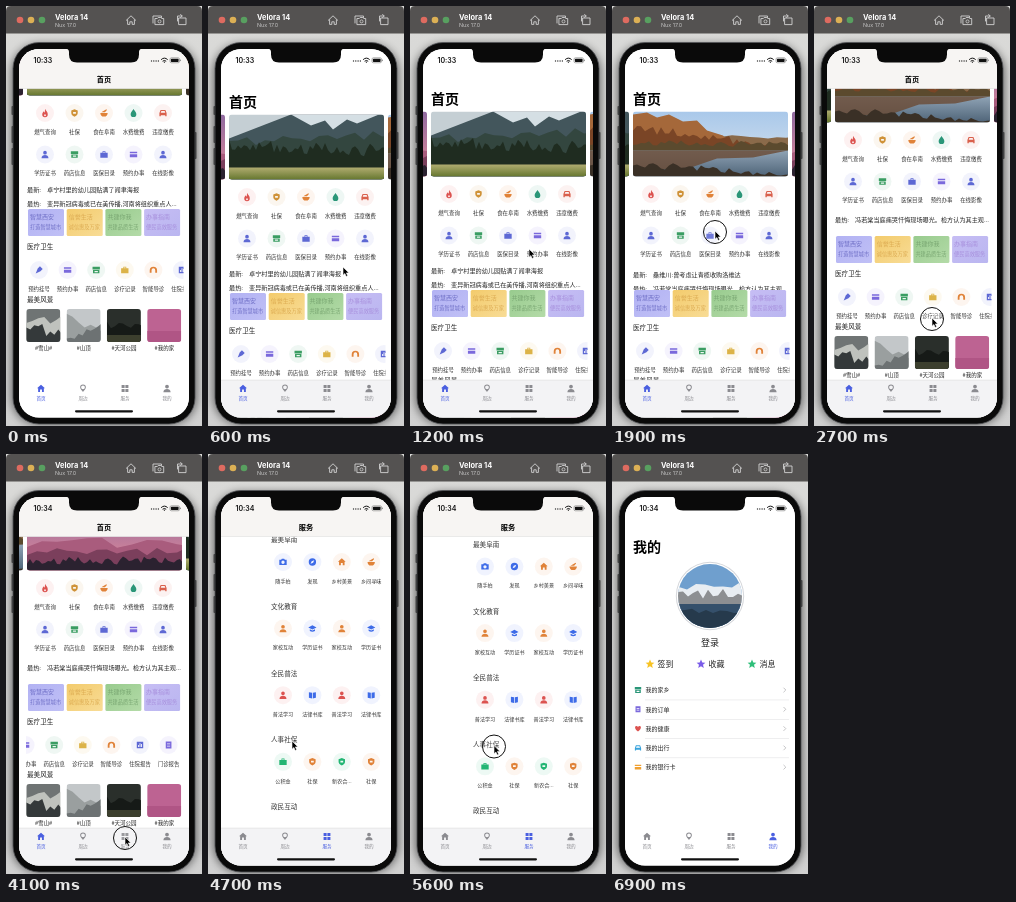
Animation of 196 by 420 pixels, one loop 7 s. Source, as an HTML page:

```html
<!DOCTYPE html>
<html lang="zh-CN">
<head>
<meta charset="utf-8">
<title>App tour</title>
<style>
html, body { margin: 0; width: 100%; height: 100%; overflow: hidden; background: #cfcfcf; }
svg { display: block; }
text { font-family: "Noto Sans CJK SC", "Noto Sans CJK", "Noto Sans", sans-serif; white-space: pre; }
.latin { font-family: Inter, "Noto Sans", sans-serif; }
.tab { color: #8b8b90; }
.tab.on { color: #4a5fe0; }
</style>
</head>
<body>
<svg id="stage" width="100%" height="100%" viewBox="0 0 196 420"></svg>
<script>
const LOOP = 7000, STEP = 100;
const RED = '#dc5350', GOLD = '#cf9238', ORANGE = '#e08238', GREEN = '#3a9d62', TEAL = '#2a9678',
      INDIGO = '#5d68d4', VIOLET = '#7a68dc', BLUE = '#3d6be8';

// Glyph outlines, centred on 0,0 in a box of about 8 units
const GLYPHS = {
  flame: 'M0-4.5C1-2 3.2-1 3 1.5A3 3 0 0 1-3 1.5C-3 0-2-1-1.7-2C-1-1-.8-.5-.5-.5C0-1.5 0-3 0-4.5ZM0 1Q-2 3 0 3.6Q2 3 0 1Z',
  shield: 'M0-4L3.5-2.8V0C3.5 2 2 3.3 0 4C-2 3.3-3.5 2-3.5 0V-2.8ZM-1.5-1.2V.8H1.5V-1.2Z',
  bowl: 'M-4 0H4C4 2 2.7 3.2 1.8 3.8H-1.8C-2.7 3.2-4 2-4 0ZM-3-.7L2.6-4L3.2-3.2L1-.7Z',
  drop: 'M0-4.3C2-1.5 3.1 0 3.1 1.3A3.1 3.1 0 0 1-3.1 1.3C-3.1 0-2-1.5 0-4.3Z',
  car: 'M-3.9 0L-2.6-3.2H2.6L3.9 0V3.4H2.4V2.4H-2.4V3.4H-3.9ZM-2.5-.3H2.5L1.8-2.1H-1.8Z',
  cap: 'M0-3.6L4.5-1.3L0 1L-4.5-1.3ZM-2.8.6L0 2L2.8.6V2.6Q0 4.2-2.8 2.6Z',
  shop: 'M-4-3.6H4V-.6H-4ZM-3.5 0H3.5V3.6H-3.5ZM-1.8 1V2.4H1.8V1Z',
  clip: 'M-3.1-3.8H3.1V3.8H-3.1ZM-1.7-1.5V-.7H1.7V-1.5ZM-1.7.7V1.5H1.7V.7Z',
  pen: 'M1-4L4-1L1.6 1.4L-3.6 3.8L-1.4-1.6Z',
  card: 'M-4-3H4V3H-4ZM-4-1.4V-.4H4V-1.4Z',
  chart: 'M-3.5-3.5H3.5V3.5H-3.5ZM-2.2 0V2.2H-1.2V0ZM-.5-2V2.2H.5V-2ZM1.2-1V2.2H2.2V-1Z',
  user: 'M0-4A2 2 0 0 1 0 0A2 2 0 0 1 0-4ZM-3.8 4C-3.8 1.5-2 .6 0 .6S3.8 1.5 3.8 4Z',
  book: 'M-3.8-3.3L-.4-2.6V3.6L-3.8 2.8ZM3.8-3.3L.4-2.6V3.6L3.8 2.8Z',
  camera: 'M-4-2.4H-2L-1.3-3.6H1.3L2-2.4H4V3.3H-4ZM0-1.5A1.8 1.8 0 0 0 0 2.1A1.8 1.8 0 0 0 0-1.5Z',
  compass: 'M0-4A4 4 0 0 1 0 4A4 4 0 0 1 0-4ZM2-2L-.8-.8L-2 2L.8.8Z',
  head: 'M-4 .5A4 4 0 0 1 4 .5V3H2V.2A2 2 0 0 0-2 .2V3H-4Z',
  bag: 'M-4-2H-1.6V-3.6H1.6V-2H4V3.4H-4ZM-.8-2.8V-2H.8V-2.8Z',
  heart: 'M0 3.6C-5-.2-4-3.4-2-3.4Q-.6-3.4 0-2Q.6-3.4 2-3.4C4-3.4 5-.2 0 3.6Z',
  star: 'M0-4.4L1.3-1.4L4.4-1.2L2 .8L2.8 3.9L0 2.2L-2.8 3.9L-2 .8L-4.4-1.2L-1.3-1.4Z',
  home: 'M0-4L4.2-.2H3V3.6H1V1H-1V3.6H-3V-.2H-4.2Z',
  pin: 'M0-4.2A3 3 0 0 1 3-1.2C3 .8 1.2 2.2 0 3.6C-1.2 2.2-3 .8-3-1.2A3 3 0 0 1 0-4.2ZM0-3.2A2 2 0 0 0 0 .8A2 2 0 0 0 0-3.2Z',
  grid: 'M-3.6-3.6H-.4V-.4H-3.6ZM.4-3.6H3.6V-.4H.4ZM-3.6.4H-.4V3.6H-3.6ZM.4.4H3.6V3.6H.4Z'
};

const rect = (x, y, w, h, fill, r = 0, more = '') =>
  `<rect x="${x}" y="${y}" width="${w}" height="${h}" rx="${r}" fill="${fill}" ${more}/>`;
const circle = (x, y, r, fill, more = '') => `<circle cx="${x}" cy="${y}" r="${r}" fill="${fill}" ${more}/>`;
const path = (d, fill, more = '') => `<path d="${d}" fill="${fill}" ${more}/>`;
const line = (d, color, w) => path(d, 'none', `stroke="${color}" stroke-width="${w}" stroke-linecap="round" stroke-linejoin="round"`);
const group = (id, body) => `<g id="${id}">${body}</g>`;
// y is the middle of the line of text
const text = (x, y, size, str, fill = '#222', anchor = 'start', more = '') =>
  `<text x="${x}" y="${y + size * .37}" font-size="${size}" fill="${fill}" text-anchor="${anchor}" ${more}>${str}</text>`;
const label = (x, y, size, str, fill) => text(x, y, size, str, fill, 'middle');
const glyph = (name, x, y, fill, k = 1) =>
  path(GLYPHS[name], fill, `fill-rule="evenodd" transform="translate(${x} ${y}) scale(${k})"`);
const entry = (x, y, [name, icon, color], gap = 19, size = 5.4) =>
  circle(x, y, 9, color, 'opacity=".08"') + glyph(icon, x, y, color, .92) + label(x, y + gap, size, name, '#333');

let clips = 0;
function photo(x, y, w, h, body, r = 3) {
  const id = 'clip' + clips++;
  return `<g transform="translate(${x} ${y})"><clipPath id="${id}">${rect(0, 0, w, h, '#000', r)}</clipPath>` +
    `<g clip-path="url(#${id})">${body}</g></g>`;
}
const noise = n => { const v = Math.sin(n * 127.1) * 43758.5; return v - Math.floor(v); };
// Jagged skyline from height y1 at the left to y2 at the right
function ridge(w, base, y1, y2, rough, fill, seed, step = 5) {
  let d = `M0 ${base}`;
  for (let x = 0, i = seed; x <= w + step; x += step, i++)
    d += `L${x} ${(y1 + (y2 - y1) * x / w + (noise(i) - .5) * rough).toFixed(1)}`;
  return path(d + `V${base}Z`, fill);
}
const fade = (id, a, b, dir = 'x2="0" y2="1"') =>
  `<linearGradient id="${id}" ${dir}><stop stop-color="${a}"/><stop offset="1" stop-color="${b}"/></linearGradient>`;

const W = 155, H = 65;
const scenes = {
  meadow: rect(0, 0, W, H, '#c5cfd4') + path('M0 24L62 0H155V65H0Z', '#43565c') +
    path('M62 0H150L128 9L118 5L104 15L96 6L82 11Z', '#d5dfe4') + ridge(W, H, 28, 20, 9, '#33463f', 21, 9) +
    ridge(W, H, 31, 36, 13, '#1f2c20', 40, 3) + rect(0, 53, W, 12, 'url(#grass)'),
  lake: rect(0, 0, W, H, 'url(#sky)') + ridge(W, 40, 18, 27, 4, '#8a6a4a', 5, 9) +
    path('M0 40V3L14 1L24 6L36 3L50 10L64 9L74 19L90 24L104 40Z', '#a5683a') + ridge(W, 40, 16, 36, 9, '#7a4526', 30, 4) +
    ridge(W, 40, 31, 33, 6, '#5b4a2e', 60, 4) + rect(0, 39, W, 26, 'url(#water)') +
    path('M0 39H155L120 46L84 47L58 56L0 60Z', '#6b4a34', 'opacity=".8"') + ridge(W, H, 52, 64, 7, '#3a3026', 77, 4),
  dusk: rect(0, 0, W, H, 'url(#sunset)') + ridge(W, H, 36, 36, 13, '#a95c7d', 4, 15) + ridge(W, H, 46, 46, 8, '#7b3f5c', 24, 10) +
    ridge(W, H, 55, 55, 8, '#2b2230', 55, 3)
};
const slides = ['dusk', 'meadow', 'lake', 'dusk', 'meadow']
  .map((name, i) => photo(21 + (i - 1) * 159, 105.5, W, H, scenes[name])).join('');

const COLS = [39, 68.5, 98, 127.5, 157];
const services = [
  [['燃气查询', 'flame', RED], ['社保', 'shield', GOLD], ['食在阜南', 'bowl', ORANGE], ['水费缴费', 'drop', TEAL], ['违章缴费', 'car', '#d9604c']],
  [['学历证书', 'user', INDIGO], ['药店信息', 'shop', GREEN], ['医保目录', 'bag', INDIGO], ['预约办事', 'card', VIOLET], ['在线影像', 'user', INDIGO]]
].map((row, r) => row.map((e, i) => entry(COLS[i], 188 + r * 41.5, e)).join('')).join('');

const news = [
  ['最新:', '卓宁村里的幼儿园贴满了闻聿海报'],
  ['最热:', '变异新冠病毒或已在美传播,河南将组织重点人...'],
  ['最新:', '桑维川:曾考虑让青榄收购洛维达'],
  ['最热:', '冯若棠当庭痛哭忏悔现场曝光。检方认为其主观...']
].map(([tag, str], i) => text(21, 264.7 + i * 14.5, 6.2, tag) + text(41, 264.7 + i * 14.5, 6.15, str)).join('');

const cards = [
  ['智慧西安', '打造智慧城市', 'lilac', '#6f6fc6'], ['信誉生活', '诚信惠及万家', 'sand', '#dcab52'],
  ['共建你我', '共建品质生活', 'leaf', '#79a672'], ['办事指南', '便民高效服务', 'plum', '#a78fdc']
].map(([a, b, bg, ink], i) => {
  const x = 22 + i * 38.7;
  return rect(x, 284, 36, 27, `url(#${bg})`, 1.5) + text(x + 2, 292, 6, a, ink) + text(x + 2, 302, 5.2, b, ink);
}).join('');

const care = [
  ['预约挂号', 'pen', INDIGO], ['预约办事', 'card', VIOLET], ['药店信息', 'shop', GREEN], ['诊疗记录', 'bag', '#dcb348'],
  ['智能导诊', 'head', ORANGE], ['住院报告', 'chart', INDIGO], ['门诊报告', 'clip', VIOLET]
].map((e, i) => entry(33 + i * 28.6, 345, e)).join('');

const views = [
  ['#雪山#', rect(0, 0, 34, 33, '#6f7474') + ridge(34, 33, 14, 8, 10, '#bfc2bd', 6, 6) + ridge(34, 33, 16, 26, 12, '#34393a', 19, 4)],
  ['#山顶', rect(0, 0, 34, 33, '#c3c7c9') + ridge(34, 33, 6, 20, 12, '#9a9f9f', 12, 6) + ridge(34, 33, 30, 18, 8, '#6d7273', 45, 4)],
  ['#天河公园', rect(0, 0, 34, 33, '#2a2f2b') + ridge(34, 33, 15, 15, 9, '#161a17', 9, 4) + rect(0, 26, 34, 7, '#3c3f2e')],
  ['#我的家', rect(0, 0, 34, 33, '#bd6392') + rect(0, 22, 34, 11, '#b05585')]
].map(([name, body], i) => photo(20.3 + i * 40.3, 384, 34, 33, body, 3) + label(37.5 + i * 40.3, 423, 5.5, name, '#222')).join('');

const bigTitle = str => text(21, 93, 14, str, '#000', 'start', 'font-weight="700"');
const homePage = group('home', group('homeBody',
  bigTitle('首页') + group('slides', slides) + services +
  `<g clip-path="url(#newsBox)">${group('news', news)}</g>` + cards +
  text(21, 322, 6.6, '医疗卫生') + `<g clip-path="url(#careBox)">${group('care', care)}</g>` +
  text(21, 375, 6.6, '最美风景') + views));

const topics = [
  ['最美阜南', ['随手拍', 'camera', BLUE], ['发现', 'compass', BLUE], ['乡村美景', 'home', ORANGE], ['乡间寻味', 'bowl', ORANGE]],
  ['文化教育', ['家校互动', 'user', ORANGE], ['学历证书', 'cap', BLUE], ['家校互动', 'user', ORANGE], ['学历证书', 'cap', BLUE]],
  ['全民普法', ['普法学习', 'user', RED], ['法律书库', 'book', BLUE], ['普法学习', 'user', RED], ['法律书库', 'book', BLUE]],
  ['人事社保', ['公积金', 'bag', '#22b573'], ['社保', 'shield', ORANGE], ['新农合...', 'shield', '#22b573'], ['社保', 'shield', ORANGE]],
  ['政民互动']
].map(([title, ...items], r) => {
  const y = 124 + r * 66.6;
  return text(63, y, 6.6, title, '#333') + items.map((e, i) => entry(75 + i * 29.4, y + 22, e, 19, 5.1)).join('');
}).join('');
const servicePage = group('service', group('serviceBody', bigTitle('服务') + topics));

const peak = rect(0, 0, 64, 64, '#6f9fce') + ridge(64, 42, 20, 20, 13, '#e8edf2', 14, 9) + ridge(64, 42, 30, 30, 10, '#8d8f92', 31, 5) +
  rect(0, 40, 64, 24, '#35506b') + ridge(64, 64, 47, 47, 5, '#263a4c', 52, 7);
const menu = [['我的家乡', 'shop', TEAL], ['我的订单', 'clip', VIOLET], ['我的健康', 'heart', RED], ['我的出行', 'car', '#38a3dc'], ['我的银行卡', 'card', '#f0a030']]
  .map(([name, icon, color], i) => {
    const y = 236 + i * 19.3;
    return glyph(icon, 26, y, color, .8) + text(33.5, y, 6, name) + line(`M171.8 ${y - 2}l2 2l-2 2`, '#b5b5b8', .8) +
      (i < 4 ? rect(33, y + 9.7, 144, .5, '#dcdcde') : '');
  }).join('');
const minePage = group('mine', bigTitle('我的') + circle(98, 142, 34.2, '#d4d6da') + circle(98, 142, 33.2, '#fff') +
  photo(66, 110, 64, 64, peak, 32) + label(98, 189, 9, '登录', '#222') +
  [['签到', 38, '#f7c325'], ['收藏', 89, '#7a5ce8'], ['消息', 140, '#2fbf7a']]
    .map(([name, x, color]) => glyph('star', x, 210, color) + text(x + 7.5, 210, 8, name)).join('') + menu);

const tabs = [['首页', 'home'], ['周边', 'pin'], ['服务', 'grid'], ['我的', 'user']].map(([name, icon], i) =>
  `<g class="tab">${glyph(icon, 35 + i * 42, 382.5, 'currentColor', .95)}${label(35 + i * 42, 392.5, 4.6, name, 'currentColor')}</g>`).join('');

const statusBar = text(27.5, 54, 7, '10:33', '#111', 'start', 'id="clock" class="latin" font-weight="600"') +
  [0, 1, 2, 3].map(i => circle(145.5 + i * 2.3, 55, .7, '#333')).join('') +
  line('M155.4 53.4q3-2.8 6 0M156.9 55q1.5-1.3 3 0', '#111', 1) + circle(158.4, 56.2, .6, '#111') +
  rect(164, 51.8, 9.5, 5, 'none', 1.4, 'stroke="#777" stroke-width=".6"') + rect(164.9, 52.7, 7.7, 3.2, '#111', .7) + rect(174.2, 53.4, .8, 1.8, '#777', .4);

const windowBar = path('M0 27.5V5Q0 0 5 0H191Q196 0 196 5V27.5Z', '#545251') +
  ['#de6b60', '#dcb055', '#58a060'].map((c, i) => circle(14 + i * 11, 14, 3.3, c)).join('') +
  text(49, 11.2, 7.4, 'Velora 14', '#fff', 'start', 'class="latin" font-weight="700"') +
  text(49, 19.4, 5.4, 'Nux 17.0', '#c4c4c4', 'start', 'class="latin"') +
  line('M120.3 14.3L125 9.8L129.7 14.3M121.6 13.8V18.4H123.8V15.8H126.2V18.4H128.4V13.8', '#d2d2d2', .9) +
  line('M147 17V10H155.5V11.5M149.3 12.5H151.3L152.2 11.5H154.8L155.7 12.5H157.7V18.6H149.3Z', '#d2d2d2', .9) +
  circle(153.5, 15.4, 1.5, 'none', 'stroke="#d2d2d2" stroke-width=".8"') +
  line('M173 12H180V18.6H173ZM171.5 15V10H176M174.6 8.4L176.2 10L174.6 11.6', '#d2d2d2', .9);

const phone = rect(5, 38, 186, 381, '#000', 28, 'opacity=".5" filter="url(#soft)"') +
  [[100, 9], [120, 17], [142, 17]].map(([y, h]) => rect(5.6, y, 2, h, '#333', .8)).join('') + rect(188.4, 126, 2, 27, '#333', .8) +
  rect(7, 36.5, 182, 381.5, '#0a0a0a', 26, 'stroke="#55565a" stroke-width=".8"');

const cursor = group('cursor', circle(0, 1, 11.5, 'rgba(255,255,255,.12)', 'id="ring" stroke="#111" stroke-width="1"') +
  path('M0 0V8.2L1.9 6.5L3.2 9.5L4.7 8.8L3.4 5.9H6Z', '#000', 'stroke="#fff" stroke-width=".6"'));

const slant = 'x2="1" y2="1"';
document.getElementById('stage').innerHTML =
  `<defs>${fade('grass', '#b0ac70', '#66772f')}${fade('sky', '#a9c8ea', '#dbe6ee')}${fade('water', '#8fa3b5', '#4f6478')}
  ${fade('sunset', '#8f6aa0', '#e58a96')}${fade('desk', '#dadad8', '#d0d0d0')}
  ${fade('lilac', '#b2b2f3', '#c0c0f6', slant)}${fade('sand', '#f3cb6c', '#f8dc96', slant)}
  ${fade('leaf', '#98cb8e', '#b4dba8', slant)}${fade('plum', '#c6bdf4', '#bab6f0', slant)}
  <filter id="soft"><feGaussianBlur stdDeviation="4"/></filter>
  <clipPath id="screen">${rect(13, 43, 170, 368.5, '#000', 20)}</clipPath>
  <clipPath id="newsBox">${rect(18, 260.5, 162, 23.5, '#000')}</clipPath>
  <clipPath id="careBox">${rect(20, 333, 157.5, 36, '#000')}</clipPath></defs>` +
  rect(0, 0, 196, 420, 'url(#desk)') + phone +
  `<g clip-path="url(#screen)">${rect(10, 43, 177, 369, '#fff')}${homePage}${servicePage}${minePage}
  ${rect(10, 43, 177, 39.5, '#fff')}
  ${group('nav', rect(10, 43, 177, 39.5, '#f7f5f3') + rect(10, 82.2, 177, .5, '#d8d8d8') +
    text(98, 73, 7.2, '首页', '#000', 'middle', 'id="navTitle" font-weight="700"'))}
  ${statusBar}${rect(10, 374, 177, 38, '#fff')}
  ${group('tabBack', rect(10, 374, 177, 38, '#f3f3f5') + rect(10, 373.8, 177, .5, '#d6d6d8'))}${tabs}
  ${rect(69, 404.3, 58, 2.1, '#111', 1.05)}</g>` +
  path('M60 42.5Q63 43 63 46V48.5Q63 56.5 71 56.5H125Q133 56.5 133 48.5V46Q133 43 136 42.5Z', '#0a0a0a') +
  windowBar + cursor;

const el = id => document.getElementById(id);
const clamp = v => Math.max(0, Math.min(1, v));
const move = (id, x, y) => el(id).setAttribute('transform', `translate(${x} ${y})`);
const show = (id, on) => el(id).setAttribute('visibility', on ? 'visible' : 'hidden');
const tabEls = [...document.querySelectorAll('.tab')];

// Keys are [time, ...values]; eased between neighbours
function track(t, keys) {
  const i = keys.findIndex(k => k[0] > t);
  if (i === 0) return keys[0].slice(1);
  if (i < 0) return keys[keys.length - 1].slice(1);
  const a = keys[i - 1], b = keys[i], u = (t - a[0]) / (b[0] - a[0]), e = u * u * (3 - 2 * u);
  return a.slice(1).map((v, n) => v + (b[n + 1] - v) * e);
}

const homeScroll = [[0, 81], [450, -6], [600, -3], [800, 0], [1900, 0], [2300, 54]];
const slideIndex = [[1200, 0], [1500, 1], [3000, 1], [3300, 2]];
const newsScroll = [[1200, 0], [1500, 25], [2200, 25], [2500, 40]];
const careScroll = [[2700, 0], [3100, 42]];
const serviceScroll = [[4350, 0], [4700, 38], [4900, 38], [5200, 72], [5400, 72], [5700, 20]];
const pointer = [[100, 134, 180], [450, 135, 261], [700, 135, 261], [1700, 103, 225], [1900, 103, 225], [2300, 103, 172],
  [2600, 118, 312], [2700, 118, 312], [3100, 76, 312], [3500, 19, 362], [4100, 119, 383], [4200, 119, 383], [4350, 84, 325],
  [4700, 84, 287], [4900, 84, 287], [5200, 84, 253], [5400, 84, 253], [5700, 84, 305], [6000, 161, 383], [6200, 161, 383], [6800, 202, 396]];
const presses = [[100, 500], [1800, 2300], [2600, 3100], [4100, 4200], [4350, 4650], [4900, 5200], [5400, 5700], [6000, 6200]];

function draw(t) {
  const page = t < 4200 ? 0 : t < 6100 ? 2 : 3;
  const [home] = track(t, homeScroll), [service] = track(t, serviceScroll);
  const scroll = [home, 0, service, 0][page];
  show('home', page === 0);
  show('service', page === 2);
  show('mine', page === 3);
  move('homeBody', 0, -home);
  move('serviceBody', 0, -service);
  move('slides', -159 * track(t, slideIndex)[0], 0);
  move('news', 0, -track(t, newsScroll)[0]);
  move('care', -track(t, careScroll)[0], 0);
  el('nav').setAttribute('opacity', clamp((scroll - 18) / 15));
  el('navTitle').textContent = page === 2 ? '服务' : '首页';
  el('tabBack').setAttribute('opacity', page === 3 ? 0 : page === 2 ? 1 : clamp((78 - home) / 20));
  el('clock').textContent = t < 3200 ? '10:33' : '10:34';
  tabEls.forEach((tab, i) => tab.classList.toggle('on', i === page));
  move('cursor', ...track(t, pointer));
  show('cursor', t >= 100 && t < 6800);
  show('ring', t < 6800 && presses.some(([a, b]) => t >= a && t < b));
}

const start = performance.now();
function tick() {
  const t = (performance.now() - start) % LOOP;
  draw(Math.floor(t / STEP) * STEP);
  requestAnimationFrame(tick);
}
tick();
</script>
</body>
</html>
```
